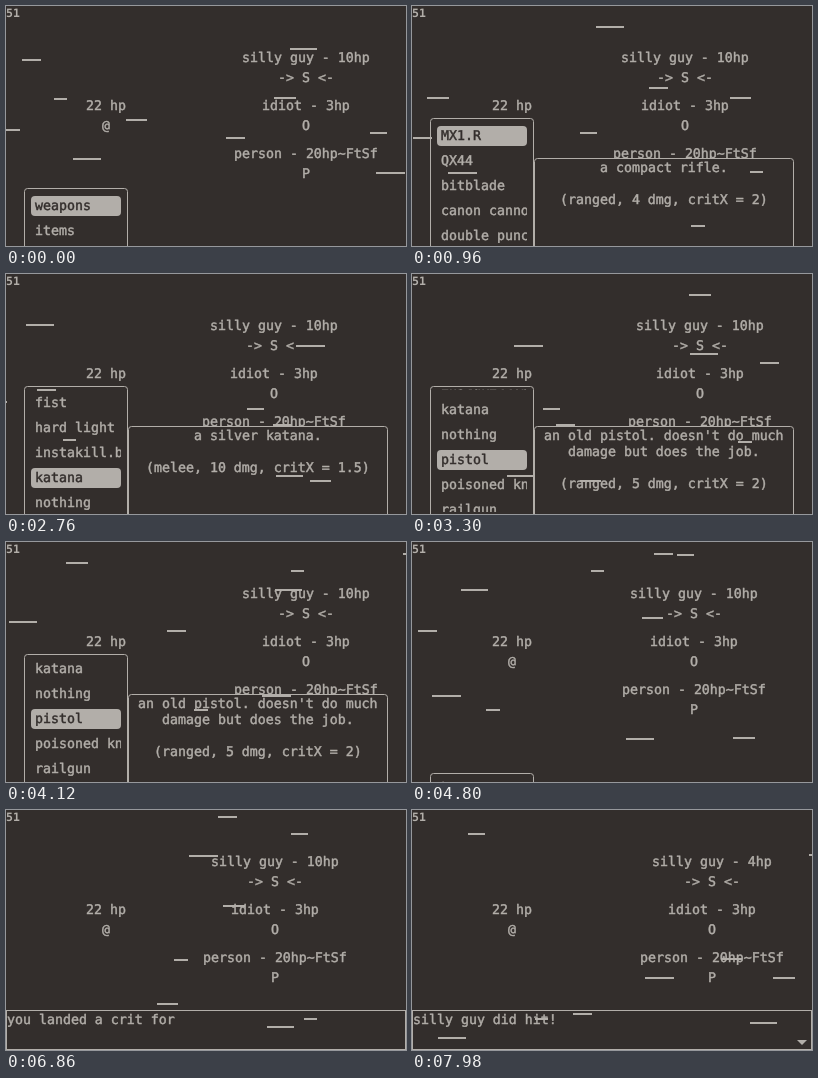
These frames come from a looping animation (400x240 px, 8000 ms). An HTML page:

```html
<!DOCTYPE html>
<html lang="en">
<head>
<meta charset="utf-8">
<title>Battle</title>
<style>
  html, body { margin: 0; width: 100%; height: 100%; overflow: hidden; background: #332e2c; }
  svg { display: block; width: 100vw; height: 100vh; }
  text { font: 13.288px "DejaVu Sans Mono", monospace; text-rendering: geometricPrecision; white-space: pre; stroke-width: 0.45px; }
  .fps { font-size: 11.5px; font-weight: bold; stroke-width: 0; }
</style>
</head>
<body>
<svg id="stage" viewBox="0 0 400 240"></svg>
<script>
const LOOP = 8000, STEP = 20;
const DARK = '#332e2c', LIGHT = '#b2aea9';
const stage = document.getElementById('stage');

const OPEN = 400, CLOSE = 4480, AIM = 4845, TALK = 6580, REPLY = 7500;
const CHAR_MS = 13;

const weapons = [
  ['MX1.R', 'a compact rifle.', '(ranged, 4 dmg, critX = 2)'],
  ['QX44', 'a heavy revolver.', '(ranged, 6 dmg, critX = 2)'],
  ['bitblade', 'a blade made of bits.', '(melee, 8 dmg, critX = 2)'],
  ['canon cannon', 'The Cannonical Cannon.', '(ranged, 7 dmg, critX = 3)'],
  ['double punch', 'two punches at once.', '(melee, 4 dmg, critX = 2)'],
  ['fist', 'your own fist.', '(melee, 2 dmg, critX = 2)'],
  ['hard light', 'a beam of solid light.', '(ranged, 8 dmg, critX = 2)'],
  ['instakill.bat', 'it ends things.', '(melee, 99 dmg, critX = 1)'],
  ['katana', 'a silver katana.', '(melee, 10 dmg, critX = 1.5)'],
  ['nothing', 'nothing at all.', '(melee, 0 dmg, critX = 1)'],
  ['pistol', "an old pistol. doesn't do much", 'damage but does the job.', '(ranged, 5 dmg, critX = 2)'],
  ['poisoned knife'],
  ['railgun']
];
// times at which the selection moves down one row
const picks = [1240, 1490, 1745, 1960, 2180, 2400, 2618, 2760, 2990, 3230];

// start x, y and length of each streak
const streaks = [
  [16, 54, 19], [48, 93, 13], [120, 114, 21], [0, 124, 14], [67, 153, 28],
  [284, 43, 27], [268, 92, 22], [220, 132, 19], [364, 127, 17], [370, 167, 29]
];

const clamp = v => Math.max(0, Math.min(1, v));
const easeOut = v => 1 - (1 - clamp(v)) ** 3;
const mix = (a, b, v) => a + (b - a) * v;
const rand = n => { const v = Math.sin(n * 127.1 + 3.7) * 43758.5453; return v - Math.floor(v); };
const esc = s => String(s).replace(/&/g, '&amp;').replace(/</g, '&lt;').replace(/>/g, '&gt;');

const text = (s, x, y, fill = LIGHT, cls = '') =>
  `<text x="${x}" y="${y}" fill="${fill}" stroke="${fill}" class="${cls}">${esc(s)}</text>`;
const centered = (s, x, y, fill) => text(s, x - s.length * 4, y, fill);
const rect = (x, y, w, h, r = 0, fill = LIGHT) =>
  `<rect x="${x}" y="${y}" width="${w}" height="${h}" rx="${r}" fill="${fill}"/>`;
const panel = (x, y, w, h, r = 3) =>
  `<rect x="${x + 0.5}" y="${y + 0.5}" width="${w - 1}" height="${h - 1}" rx="${r}" fill="${DARK}" stroke="${LIGHT}"/>`;

function fighters(t) {
  const x = Math.round(275.3 + 25 * Math.cos((10 + 0.0883 * t) * Math.PI / 180));
  const hp = t < 7040 ? 10 : 4;
  return centered('22 hp', 100, 104) + centered('@', 100, 124) +
    centered(`silly guy - ${hp}hp`, x, 56) + centered('-> S <-', x, 76) +
    centered('idiot - 3hp', x, 104) + centered('O', x, 124) +
    centered('person - 20hp~FtSf', x, 152) + centered('P', x, 172);
}

function selection(t) {
  let index = 0, scroll = 0;
  picks.forEach((at, i) => {
    if (t < at) return;
    index = i + 1;
    const until = Math.min(t, picks[i + 1] ?? t);
    scroll = mix(scroll, Math.max(0, 25 * index - 47), easeOut((until - at) / 250));
  });
  return { index, scroll };
}

function menu(t) {
  const opened = t >= OPEN;
  const slideIn = easeOut((t - OPEN) / 400), slideOut = easeOut((t - CLOSE) / 400);
  const top = Math.round(mix(mix(182, 112, slideIn), 232, slideOut));
  const { index, scroll } = selection(t);
  const names = opened ? weapons.map(w => w[0]) : ['weapons', 'items'];
  let rows = '';
  names.forEach((name, i) => {
    const y = Math.round(top + 8 + 25 * i - scroll), on = i === index;
    if (y < top - 25 || y > 240) return;
    rows += (on ? rect(25, y, 90, 20, 4) : '') + text(name, 29, y + 14, on ? DARK : LIGHT);
  });
  let out = panel(18, top, 104, 160) +
    `<clipPath id="rows"><rect x="25" y="${top + 3}" width="90" height="123"/></clipPath>` +
    `<g clip-path="url(#rows)">${rows}</g>`;

  const y = Math.round(mix(mix(240, 152, slideIn), 242, slideOut));
  if (opened && y < 240) {
    const lines = weapons[index].slice(1);
    lines.splice(-1, 0, '');
    out += panel(122, y, 260, 120) +
      lines.map((s, i) => centered(s, 252, y + 14 + 16 * i)).join('');
  }
  return out;
}

function pistol() {
  const teeth = Array.from({ length: 12 }, (_, i) =>
    rect(159 + (i % 6) * 2.5 + (i > 5 ? 1 : 0), i > 5 ? 104 : 102, 1.5, 1.5)).join('');
  return `<g fill="${LIGHT}" shape-rendering="crispEdges">
    <path d="M162 98H166V99H214V98H217V99L219 101V108H160L155 106V101H161Z"/>
    <path d="M158 101H217V106H158Z" fill="${DARK}"/>
    <path d="M167 107H219V104H232V109H211V118L207 123H195L188 127L187 143H174L170 139V132L175 121L176 112L167 109Z"/>
    <path d="M203 112H208V117L205 120H201Z" fill="${DARK}"/></g>` + teeth;
}

function aiming(t) {
  return pistol() + rect(136, 180, 128, 16) + centered('CRANK CLOCKWISE!', 200, 192, DARK) +
    centered(String(Math.round(AIM + 3500 - t)), 200, 232);
}

function dialog(t) {
  const [line, at] = t < REPLY ? ['you landed a crit for 6 damage!', TALK] : ['silly guy did hit!', REPLY];
  const shown = Math.floor((t - at) / CHAR_MS);
  return panel(0, 200, 400, 40, 0) + text(line.slice(0, shown), 1, 214) +
    (shown >= line.length ? `<path d="M385 230H395L390 235Z" fill="${LIGHT}"/>` : '');
}

function dashes(t) {
  return streaks.map(([x, y, len], i) => {
    const right = x + len - len * 0.012 * t;
    const lap = Math.floor(right / 440);
    const row = lap ? 4 + Math.round(rand(i * 31 - lap * 7) * 230) : y;
    return rect(Math.round(right - lap * 440 - len), row - 1, len, 2);
  }).join('');
}

function render(t) {
  stage.innerHTML = rect(0, 0, 400, 240, 0, DARK) + fighters(t) +
    (t < TALK ? menu(t) : dialog(t)) +
    (t >= AIM && t < TALK ? aiming(t) : '') +
    dashes(t) + text('51', 0, 11, LIGHT, 'fps');
}

const start = performance.now();
function tick() {
  const t = (performance.now() - start) % LOOP;
  render(Math.floor(t / STEP) * STEP);
  requestAnimationFrame(tick);
}
tick();
</script>
</body>
</html>
```
